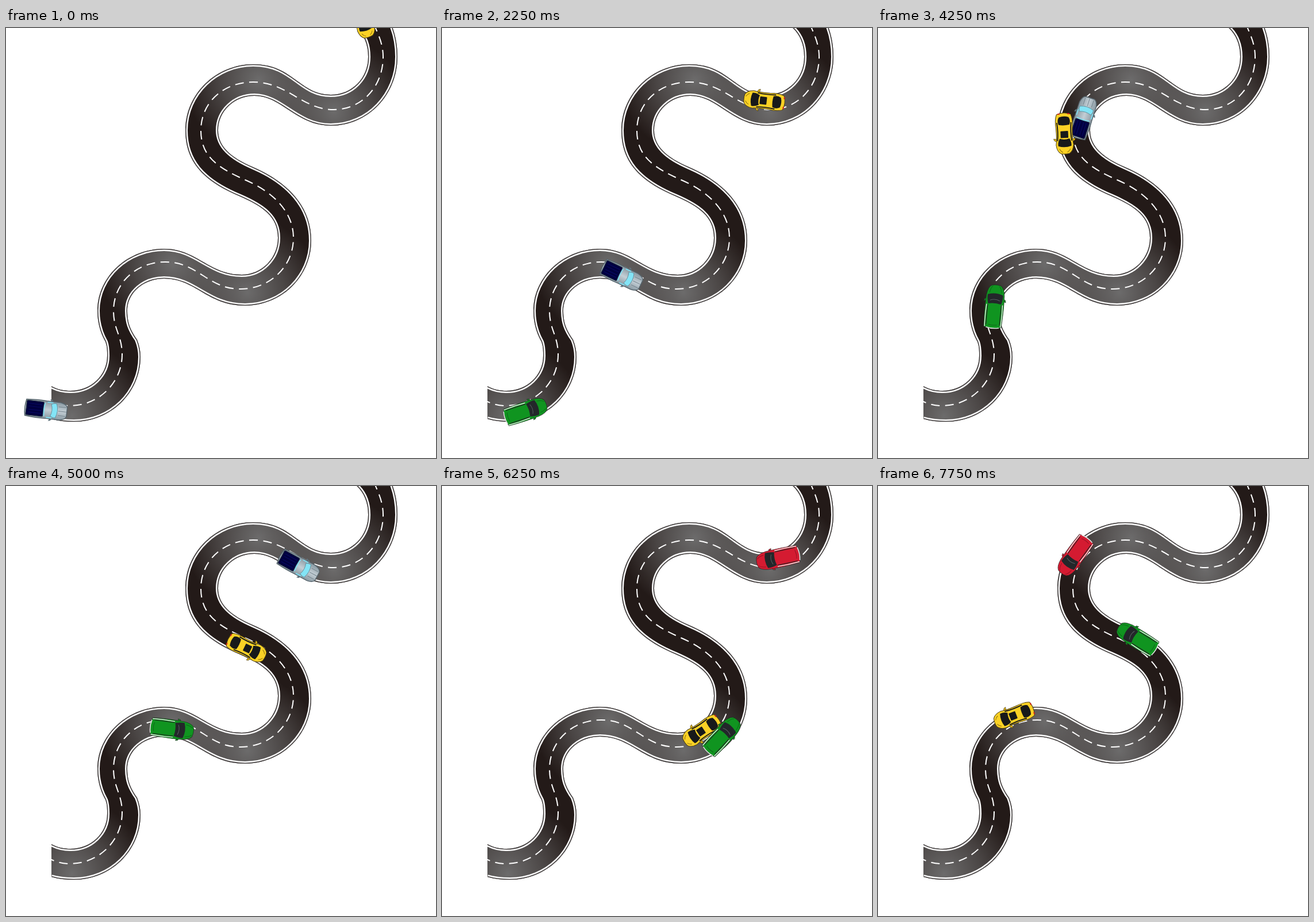
These frames come from a looping animation (748 by 748 pixels, 8 s). An HTML page:

```html
<!DOCTYPE html>
<html lang="en">
<head>
<meta charset="utf-8">
<title>Winding road</title>
<style>
  html, body { margin: 0; width: 100%; height: 100%; overflow: hidden; background: #fff; }
  svg { display: block; width: 100vw; height: 100vh; }
</style>
</head>
<body>
<svg viewBox="0 0 748 748">
  <defs>
    <radialGradient id="shine">
      <stop offset="0" stop-color="#6c6b6b"/>
      <stop offset=".5" stop-color="#6c6b6b" stop-opacity=".55"/>
      <stop offset="1" stop-color="#6c6b6b" stop-opacity="0"/>
    </radialGradient>
    <linearGradient id="metal" x2="0" y2="1">
      <stop offset="0" stop-color="#8797a0"/>
      <stop offset=".5" stop-color="#c3ced5"/>
      <stop offset="1" stop-color="#8797a0"/>
    </linearGradient>
    <clipPath id="roadClip"><path id="surface"/></clipPath>
    <g id="suv">
      <path d="M11-14l-2-6 4 1 2 5zM11 14l-2 6 4-1 2-5z" fill="currentColor" stroke="#222" stroke-width=".6"/>
      <path d="M-35-16Q-5-18 20-16.500Q33-15 37-9Q40 0 37 9Q33 15 20 16.500Q-5 18-35 16Q-40 0-35-16z" fill="currentColor" stroke="#222" stroke-opacity=".7"/>
      <path d="M-36-12Q-39 0-36 12M-35-14.500Q-15-16 4-14.500M-35 14.500Q-15 16 4 14.500" fill="none" stroke="#e4e8e4" stroke-width="1.500"/>
      <path d="M-32-12.500H4M-32 12.500H4" stroke="#222" stroke-width="1.200"/>
      <path d="M5-12Q15-15 21-14Q26 0 21 14Q15 15 5 12Q8 0 5-12z" fill="#23272a"/>
      <path d="M11-9Q15 0 11 9" fill="none" stroke="#596064"/>
      <path d="M24-11Q33-10 36-6M24 11Q33 10 36 6M-31-8Q-33 0-31 8" fill="none" stroke="#000" stroke-opacity=".3"/>
    </g>
  </defs>

  <g clip-path="url(#roadClip)">
    <rect width="748" height="748" fill="#231a18"/>
    <g id="lights" fill="url(#shine)"></g>
    <g id="edges" fill="none"></g>
    <path id="middle" fill="none" stroke="#fff" stroke-width="2" stroke-dasharray="15 9.500" stroke-dashoffset="-1" d="M19 645Q50 646 79 650C90 655 100 657 112 657C160 657 202 618 202 568C202 535 187 525 187 492C187 445 225 407 277 407C335 407 350 454 408 454C458 454 500 416 500 365C500 318 462 285 420 266C370 244 339 225 339 178C339 130 378 94 430 94C490 94 515 142 570 142C618 142 656 103 656 50C656 30 649 14 642-2C634-20 626-45 620-90"/>
  </g>

  <g id="pickup">
    <path d="M8-16l-2-4 4 1 2 3zM8 16l-2 4 4-1 2-3z" fill="#62727b"/>
    <path d="M-35-15Q-15-17 0-16L25-16Q36-14 37-8V8Q36 14 25 16L0 16Q-15 17-35 15Q-38 0-35-15z" fill="url(#metal)" stroke="#56646c" stroke-width="1.500"/>
    <rect x="-34" y="-13.500" width="30" height="27" rx="2" fill="#00003f" stroke="#2d3842"/>
    <path d="M-30-8H-7M-30-3H-7M-30 3H-7M-30 8H-7" stroke="#0a0a68"/>
    <path d="M-2-12Q-4 0-2 12M2-14H12M2 14H12" fill="none" stroke="#7fdcf0" stroke-width="2"/>
    <path d="M9-11Q14-14 18-13Q23 0 18 13Q14 14 9 11Q13 0 9-11z" fill="#83e4f6" stroke="#5d8793" stroke-width=".8"/>
    <path d="M22-8H35M22 0H36M22 8H35" stroke="#71818a"/>
  </g>
  <g id="taxi">
    <path d="M10-14l-1-6 3 1 3 5zM10 14l-1 6 3-1 3-5z" fill="#e4b815" stroke="#332b12" stroke-width=".6"/>
    <path d="M-33-13Q-24-17-8-15Q10-14 20-16Q31-15 35-8Q37 0 35 8Q31 15 20 16Q10 14-8 15Q-24 17-33 13Q-38 0-33-13z" fill="#fad125" stroke="#4a3d12"/>
    <path d="M-28-9Q-22-13-15-10Q-13 0-15 10Q-22 13-28 9Q-31 0-28-9z" fill="#17191a"/>
    <path d="M9-9Q16-13 22-12Q26 0 22 12Q16 13 9 9Q12 0 9-9z" fill="#17191a"/>
    <rect x="-4" y="-7" width="12" height="14" rx="1" fill="#17191a"/>
    <path d="M-19-13Q-3-11 13-13M-19 13Q-3 11 13 13" fill="none" stroke="#17191a" stroke-width="2"/>
    <path d="M-34-11v4M-34 7v4" stroke="#d3281c" stroke-width="2"/>
    <path d="M27-10Q31-8 33-4M27 10Q31 8 33 4" fill="none" stroke="#8a6c0c"/>
  </g>
  <use id="green" href="#suv" color="#109420"/>
  <use id="red" href="#suv" color="#d41b31"/>
</svg>
<script>
const LOOP = 8000, STEP = 250, LANE = 15;
const $ = id => document.getElementById(id);
const middle = $("middle"), roadLength = middle.getTotalLength();

const upper = "M79 623C90 629 101 631 112 631C148 631 176 604 176 570C176 562 176 554 173 546C164 530 159 512 159 492C159 432 212 384 275 384C332 384 353 429 410 429C445 429 473 400 473 365C473 328 446 310 407 293C340 265 312 230 312 178C312 114 366 63 430 63C500 63 510 116 565 116C602 116 630 87 630 50C630 28 622 10 608-2";
const lower = "M672-2C678 14 681 32 681 50C681 116 630 170 565 170C505 170 480 118 432 118C397 118 369 145 369 178C369 205 390 225 430 242C490 268 531 310 531 370C531 432 480 483 416 483C350 483 330 436 275 436C240 436 211 460 211 492C211 512 216 525 228 542C232 552 234 562 234 572C234 635 182 685 118 685C105 685 92 684 79 680";

$("surface").setAttribute("d", upper + lower.replace("M", "L") + "Z");
$("edges").innerHTML = [["#fff", 8], ["#484444", 3.2]]
  .map(([color, width]) => `<path d="${upper}${lower}" stroke="${color}" stroke-width="${width}"/>`).join("");
$("lights").innerHTML = [[440, 90], [570, 145], [290, 410], [420, 460], [115, 675]]
  .map(([x, y]) => `<circle cx="${x}" cy="${y}" r="130"/>`).join("");

// Distance along the road of the spot closest to a point
function distanceAt(x, y) {
  let best = 0, least = Infinity;
  for (let s = 0; s <= roadLength; s++) {
    const p = middle.getPointAtLength(s), gap = Math.hypot(p.x - x, p.y - y);
    if (gap < least) [best, least] = [s, gap];
  }
  return best;
}

// A car passes a few spots [time, x, y]; the road gives its course between them.
function car(id, ...stops) {
  const keys = stops.map(([time, x, y]) => ({ time, s: distanceAt(x, y) }));
  return { node: $(id), keys, turn: keys[0].s < keys[1].s ? 0 : 180 };
}
const cars = [
  car("pickup", [0, 69, 660], [1000, 200, 618], [2250, 312, 431], [4250, 361, 158], [5500, 647, 112], [6200, 634, -80]),
  car("taxi", [0, 617, -17], [1000, 639, 61], [2250, 561, 122], [4250, 327, 183], [5500, 476, 334], [7000, 352, 420], [7750, 239, 404]),
  car("green", [1500, 62, 663], [2250, 145, 665], [4250, 203, 485], [5500, 374, 458], [7000, 506, 333], [7750, 449, 268]),
  car("red", [5000, 605, -70], [5500, 628, 17], [7000, 443, 79], [7750, 345, 123])
];

function speed(keys, i) {
  const a = keys[Math.max(i - 1, 0)], b = keys[Math.min(i + 1, keys.length - 1)];
  return (b.s - a.s) / (b.time - a.time);
}

// Smooth Hermite interpolation of the distance driven
function travelled(keys, time) {
  const j = Math.max(keys.findIndex(k => k.time >= time), 1), i = j - 1;
  const span = keys[j].time - keys[i].time, u = (time - keys[i].time) / span;
  return keys[i].s + (keys[j].s - keys[i].s) * u * u * (3 - 2 * u) +
    span * u * (1 - u) * ((1 - u) * speed(keys, i) - u * speed(keys, j));
}

function place({ node, keys, turn }, time) {
  const onRoad = time >= keys[0].time && time <= keys[keys.length - 1].time;
  node.style.display = onRoad ? "" : "none";
  if (!onRoad) return;
  const s = travelled(keys, time);
  const p = middle.getPointAtLength(s);
  const back = middle.getPointAtLength(s - 4), ahead = middle.getPointAtLength(s + 4);
  const heading = Math.atan2(ahead.y - back.y, ahead.x - back.x) * 180 / Math.PI + turn;
  node.setAttribute("transform",
    `translate(${p.x} ${p.y}) rotate(${heading}) translate(0 ${LANE}) scale(1 .95)`);
}

function draw() {
  const time = Math.floor(performance.now() % LOOP / STEP) * STEP;
  cars.forEach(c => place(c, time));
  requestAnimationFrame(draw);
}
draw();
</script>
</body>
</html>
```
